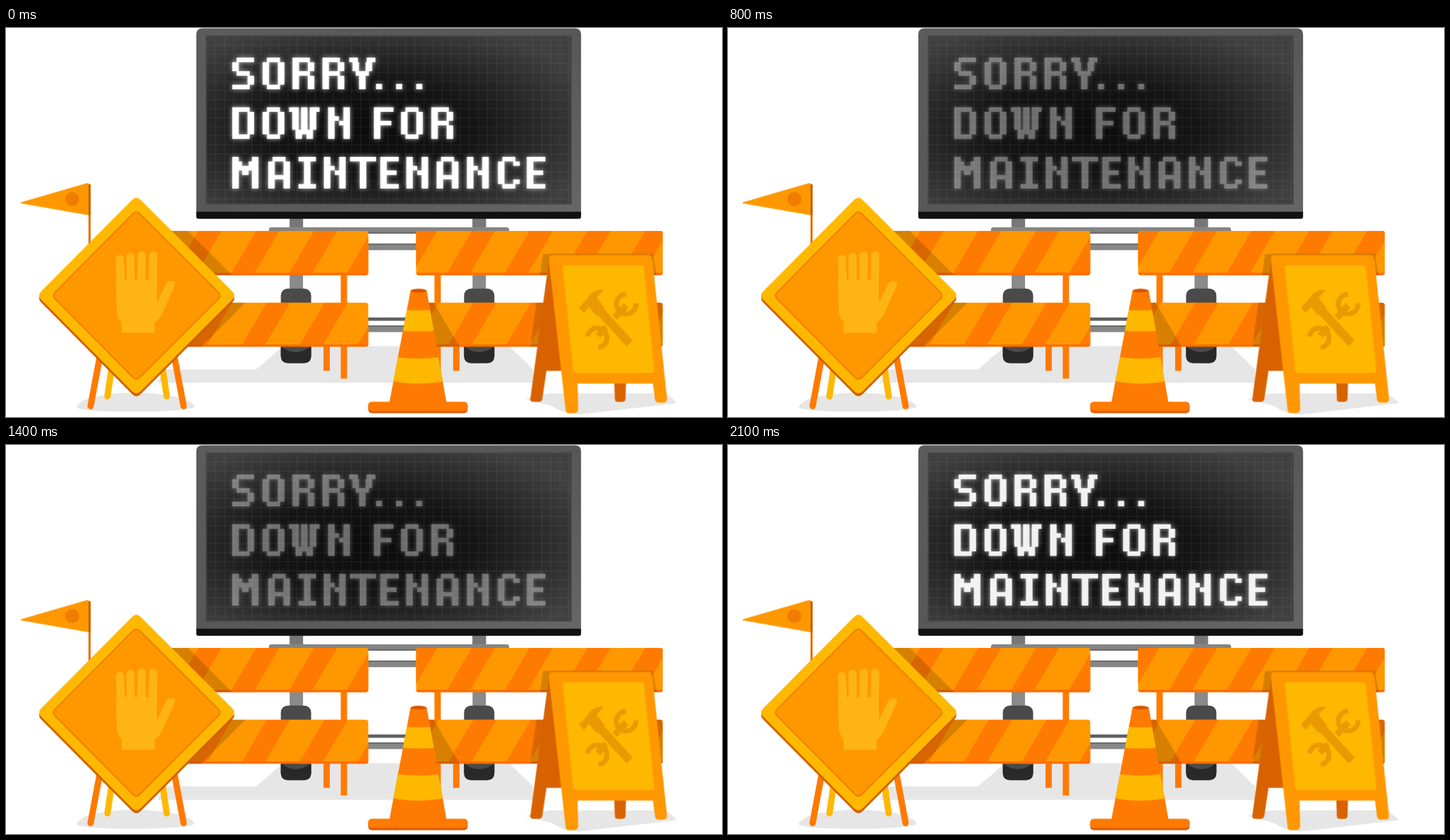
An HTML page for the animation above (2.2 s loop, 1015 by 552 pixels).

```html
<!DOCTYPE html>
<html lang="en">
<head>
<meta charset="utf-8">
<title>Down for maintenance</title>
<style>
  html, body { margin: 0; width: 100%; height: 100%; overflow: hidden; background: #fff; }
  svg { display: block; width: 100vw; height: 100vh; }
</style>
</head>
<body>
<svg viewBox="0 0 1016 552.500" preserveAspectRatio="none">
  <defs>
    <linearGradient id="frame" x2="1" y2="1">
      <stop stop-color="#5c5c5c"/><stop offset=".5" stop-color="#575757"/><stop offset="1" stop-color="#666"/>
    </linearGradient>
    <radialGradient id="screen" cx=".45" cy=".55" r=".65">
      <stop stop-color="#0b0b0b"/><stop offset=".45" stop-color="#151515"/><stop offset="1" stop-color="#404040"/>
    </radialGradient>
    <pattern id="grid" x="284" y="11" width="12.86" height="12.86" patternUnits="userSpaceOnUse">
      <path d="M0 .5H12.86M.5 0V12.86" stroke="#fff" stroke-opacity=".07"/>
    </pattern>
    <filter id="blur" x="-10%" y="-20%" width="120%" height="140%"><feGaussianBlur stdDeviation="3.5"/></filter>
    <path id="diamond" d="M179 244Q185 238 191 244L321 374Q327 380 321 386L191 516Q185 522 179 516L50 386Q44 380 50 374Z"/>
    <clipPath id="boards">
      <rect x="200" y="288" width="314" height="63" rx="4"/>
      <rect x="200" y="390" width="314" height="63" rx="4"/>
      <rect x="582" y="288" width="350" height="63" rx="4"/>
      <rect x="582" y="390" width="350" height="63" rx="4"/>
    </clipPath>
    <clipPath id="cone"><path d="M574 373Q585 368 597 373L625 532H544Z"/></clipPath>
  </defs>

  <!-- ground shadows -->
  <g fill="#e6e6e6">
    <path d="M225 485H355L393 452H714L748 485V504H215Z"/>
    <path d="M100 539Q104 528 130 523Q184 513 236 523Q264 528 268 538Q258 545 184 545T100 539Z"/>
    <path d="M737 527L770 519H935Q952 530 951 533L812 549Q790 548 775 537Z"/>
  </g>

  <!-- trailer -->
  <path d="M513 413.500H600" stroke="#616161" stroke-width="5"/>
  <path d="M500 427.500H600M500 311H600" stroke="#878787" stroke-width="9"/>
  <path d="M500 307H600M500 423.500H600" stroke="#6b6b6b" stroke-width="2"/>
  <path d="M412 270V380M671.500 270V380" stroke="#8a8a8a" stroke-width="19"/>
  <path d="M402.500 271h19v12h-19zM662 271h19v12h-19z" fill="#777"/>
  <path d="M373 292V287Q373 283 377 283H710Q714 283 714 287V292Z" fill="#858585"/>
  <path d="M373 291H714" stroke="#6a6a6a" stroke-width="2"/>
  <g id="wheels"></g>

  <!-- display -->
  <path d="M270 262V9Q270 .500 279 .500H807Q816 .500 816 9V262Z" fill="url(#frame)"/>
  <path d="M270 261H816V268Q816 271 813 271H273Q270 271 270 268Z" fill="#111"/>
  <rect x="284" y="11" width="518" height="239" fill="url(#screen)"/>
  <rect x="284" y="11" width="518" height="239" fill="url(#grid)"/>
  <rect x="284" y="11" width="518" height="239" fill="none" stroke="#484848" stroke-width="1.500"/>
  <g id="message" fill="#fff" fill-rule="evenodd" role="img" aria-label="SORRY... DOWN FOR MAINTENANCE">
    <g id="glow" filter="url(#blur)" opacity=".65"></g>
    <g id="letters"></g>
  </g>

  <!-- barriers -->
  <path d="M479.500 350V498M455 450V487M612.500 350V498M639 450V487" stroke="#ff7a00" stroke-width="9"/>
  <g clip-path="url(#boards)">
    <path d="M200 288H932V453H200Z" fill="#ff9800"/>
    <path id="stripes" fill="#ff7a00"/>
    <path d="M200 349.500H932M200 451.500H932" stroke="#ff6d00" stroke-width="4"/>
    <g opacity=".16">
      <use href="#diamond" x="23"/>
      <path d="M762 321H918L932 400V453H744ZM597 373L644 453H610Z"/>
    </g>
  </g>

  <!-- flag and diamond sign -->
  <path d="M118.500 222V310" stroke="#e86c00" stroke-width="3"/>
  <path d="M21 247.500L114 220.500Q118 219.500 118 222V266L21 249Z" fill="#ff9800"/>
  <path d="M118.500 222V266" stroke="#c96000" stroke-width="3"/>
  <circle cx="94" cy="243" r="10" fill="#f07c00"/>
  <g stroke-width="9" stroke-linecap="round">
    <path d="M151 475L144 523M221 475L228 523" stroke="#ffb800"/>
    <path d="M134 462L120 537M238 462L252 537" stroke="#ff7a00"/>
  </g>
  <use href="#diamond" y="4" fill="#cf5f00"/>
  <use href="#diamond" fill="#ffb800"/>
  <path d="M180 264Q185 259 190 264L301 375Q306 380 301 385L190 496Q185 501 180 496L70 385Q65 380 70 375Z" fill="#ff9800" stroke="#ec8000" stroke-width="2"/>
  <g fill="#ffb415">
    <path d="M156 358H214V391L227 364Q231 357 238 360Q241 362 239 367L222 405Q219 412 211 419V433H164V418Q157 411 157 398Z"/>
    <path d="M161.500 328L163 366M176.500 325L177 366M192.500 323L192 366M209 323L208 366" stroke="#ffb415" stroke-width="11.500" stroke-linecap="round"/>
  </g>

  <!-- cone -->
  <rect x="514" y="531" width="141" height="16" rx="5" fill="#d95a00"/>
  <rect x="514" y="531" width="141" height="13" rx="5" fill="#ff7a00"/>
  <g clip-path="url(#cone)">
    <path d="M540 365H630V535H540Z" fill="#ff7a00"/>
    <path d="M540 398Q585 404 630 398V427Q585 435 540 427ZM540 465Q585 474 630 465V500Q585 510 540 500Z" fill="#ffb800"/>
  </g>
  <ellipse cx="585.500" cy="373" rx="11" ry="2.500" fill="#d95300"/>

  <!-- folding board -->
  <path d="M771 325L744 527Q744 531 748 531H756Q760 531 761 527L767 487H800V335Z" fill="#d86200"/>
  <path d="M863 500H880L879 528Q878 531 874 531H868Q864 531 864 527Z" fill="#d86200"/>
  <path d="M775 321H911Q916 321 917 326L938 527Q938 531 934 532H926Q922 532 921 528L918 505H811L812 542Q811 547 806 547H799Q794 547 794 542L770 327Q770 321 775 321Z" fill="#ff9800"/>
  <path d="M770 328Q769 321 775 321.500H911Q917 321 917 328" fill="none" stroke="#d47d00" stroke-width="2"/>
  <path d="M792 337H902Q905 337 905 340L920 487Q920 490 917 490H809Q806 490 805 487L790 340Q790 337 792 337Z" fill="#ffb800"/>
  <g fill="none" stroke="#e89a00">
    <path d="M840 437L880 394" stroke-width="9"/>
    <path d="M880 378A14 14 0 1 0 894 391M841 454A14 14 0 1 0 825 438" stroke-width="7"/>
    <path d="M842 401L887 450" stroke="#ffb800" stroke-width="18"/>
    <path d="M841 400L885 448" stroke-width="12"/>
  </g>
  <path d="M813 397L825 384Q833 370 848 372L838 383L850 398L838 409L827 396L820 405Z" fill="#e89a00"/>
</svg>
<script>
const $ = id => document.getElementById(id);

// Glyph outlines: x in half columns, y in seven rows.
const GLYPHS = {
  S: "M2 0h8v1h-7v2h5v1h2v2h-2v1h-8v-1h7v-2h-5v-1h-2v-2h2z",
  O: "M2 0h6v1h2v5h-2v1h-6v-1h-2v-5h2zM3 1v5h4v-5z",
  R: "M0 0h8v1h2v2h-2v1h2v3h-3v-3h-4v3h-3zM3 1v2h4v-2z",
  Y: "M0 0h4v1h.5v2h3v-2h.5v-1h4v1h-1.5v2h-1.5v1h-1.5v3h-3v-3h-1.5v-1h-1.5v-2h-1.5z",
  ".": "M0 5.8h2.8v1.2h-2.8z",
  D: "M0 0h8v1h2v5h-2v1h-8zM3 1v5h4v-5z",
  W: "M0 0h4.5v5h1v-5h3v5h1v-5h4.500v1h-1.5v4h-1.5v2h-3v-1h-2v1h-3v-2h-1.5v-4h-1.5z",
  N: "M0 0h3v2h2v1h2v-3h3v7h-3v-3h-2v-1h-2v4h-3z",
  F: "M0 0h9v1h-6v2h5v1h-5v3h-3z",
  M: "M0 0h3v1h1.5v1h3v-1h1.5v-1h3v7h-3v-4h-1.5v1h-3v-1h-1.5v4h-3z",
  A: "M2 0h6v1h2v6h-3v-2h-4v2h-3v-6h2zM3 1v3h4v-3z",
  I: "M0 0h8v1h-2.5v5h2.5v1h-8v-1h2.5v-5h-2.5z",
  T: "M0 0h12v1h-4.5v6h-3v-6h-4.5z",
  E: "M0 0h8.5v1h-5.5v2h4.5v1h-4.5v2h5.5v1h-8.5z",
  C: "M2 0h6v1h2v1h-3v-1h-4v5h4v-1h3v1h-2v1h-6v-1h-2v-5h2z"
};
const LINES = [
  ["SORRY...", 42, [321, 364, 406.5, 449, 487, 525, 553.5, 582]],
  ["DOWNFOR", 112.5, [321, 364, 401.5, 457, 522, 560.5, 603.5]],
  ["MAINTENANCE", 183, [321, 372, 415, 451, 488, 531, 568, 611, 654, 698, 739]]
];
const text = LINES.map(([chars, y, xs]) => xs.map((x, i) =>
  `<path transform="translate(${x} ${y}) scale(3.1 6.43)" d="${GLYPHS[chars[i]]}"/>`).join("")).join("");
$("letters").innerHTML = $("glow").innerHTML = text;

const stripes = (from, to, y) => {
  let d = "";
  for (let x = from; x < to; x += 82) d += `M${x} ${y}h33l-37 63h-33z`;
  return d;
};
$("stripes").setAttribute("d", stripes(273, 550, 288) + stripes(579, 980, 288) +
  stripes(288, 540, 390) + stripes(581, 980, 390));

$("wheels").innerHTML = [390, 650].map(x => `
  <rect x="${x}" y="370" width="43" height="106" rx="10" fill="#4a4a4a"/>
  <path d="M${x} 452q21 17 43 0v14q0 10-10 10h-23q-10 0-10-10z" fill="#292929"/>`).join("");

const LOOP = 2200, STEP = 100;

function draw(now) {
  const step = Math.floor(now % LOOP / STEP);
  const fade = .95 * Math.min(step, 22 - step) / 11;
  // The glow under the letters slows the dimming while it is bright.
  $("message").setAttribute("opacity", 1 - fade * (1 - .4 * (1 - fade)));
  requestAnimationFrame(draw);
}
draw(performance.now());
</script>
</body>
</html>
```
